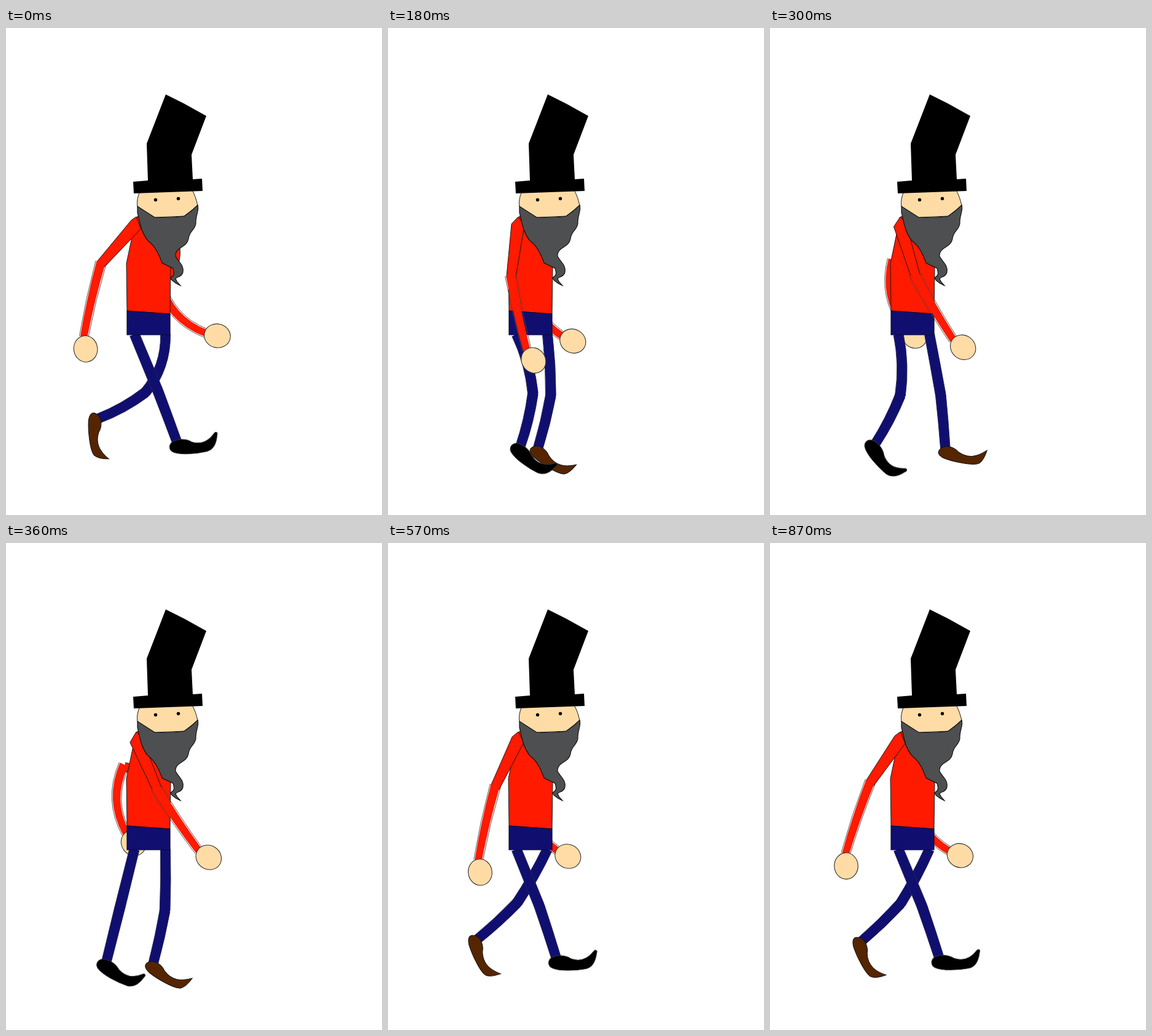
These frames come from a looping animation (612 by 792 pixels, 900 ms). An HTML page with a canvas:

```html
<!DOCTYPE html>
<html lang="en">
<head>
<meta charset="utf-8">
<title>Walking man</title>
<style>
html, body { margin: 0; width: 100%; height: 100%; overflow: hidden; background: #fff; }
canvas { display: block; width: 612px; height: 792px; }
</style>
</head>
<body>
<canvas id="stage" width="612" height="792"></canvas>
<script>
const ctx = document.getElementById('stage').getContext('2d');
const LOOP = 900, STEP = 30;
const RED = '#ff1a00', BLUE = '#100f70', SKIN = '#ffdca6', BROWN = '#552500', INK = '#1a1a1a';

// Joint angles in degrees from straight down, positive to the right
const TIMES = [0, 120, 240, 360, 480, 570, 870];
const GAIT = {
  nearArm: [-42, -21, 5, 23, -2, -26, -35],
  farArm: [19, 10.5, -3, -28.5, -9.5, 2, 7.5],
  nearLeg: [21.5, 13.5, -10, -14, 13, 20, 20.5],
  nearKnee: [1, 0, 29, 0, 1, 2, 2],
  farLeg: [-40, -30.5, 16, -6.5, -32, -38.5, -37],
  farKnee: [21, 18, 0, 6, 7, 9, 9]
};

const hat = new Path2D('M260 108L290 123L326 143L302 206L304 246L319 245L320 265L208 269L207 250L231 248L229 188Z');
const head = new Path2D('M218 266Q212 278 214 291L242 308L290 306L312 289Q309 274 303 264Z');
const beard = new Path2D('M214 290L242 308Q275 309 290 306Q302 298 312 288C315 296 308 306 309 318C307 330 298 330 297 343C294 358 275 356 276 371C280 380 290 385 288 397C286 406 277 404 276 408C278 414 282 416 284 419C278 416 268 411 268 406C275 402 274 398 272 391L254 382C248 365 240 352 231 346C219 331 218 315 214 300Z');
const shirt = new Path2D('M214 306L206 335L196 383L197 460L267 465L268 388L268 330Z');
const trousers = new Path2D('M197 460L267 465V499H197Z');
const blackShoe = new Path2D('M-10 2C-4 -5 14 -5 24 2C40 8 52 2 61 -9C64 -13 68 -11 66 -6C64 8 58 17 48 19C30 22 5 22 -6 17C-13 14 -14 7 -10 2Z');
const brownShoe = new Path2D('M-7 1C0 -7 14 -5 22 1C40 9 54 2 67 -11C66 0 63 8 59 12C50 19 15 18 2 16C-11 13 -12 7 -7 1Z');

// Monotone cubic through the keys, so turning points stay at the keys
function slope(keys, i) {
  const d = j => (keys[j + 1] - keys[j]) / (TIMES[j + 1] - TIMES[j]);
  if (i === 0) return d(0);
  if (i === keys.length - 1) return d(i - 1);
  const a = d(i - 1), b = d(i);
  return a * b > 0 ? 2 * a * b / (a + b) : 0;
}

function sample(keys, t) {
  let i = TIMES.length - 2;
  while (i > 0 && t < TIMES[i]) i--;
  const h = TIMES[i + 1] - TIMES[i], u = Math.min(1, (t - TIMES[i]) / h);
  const u2 = u * u, u3 = u2 * u;
  return keys[i] + (keys[i + 1] - keys[i]) * (3 * u2 - 2 * u3) +
    h * (slope(keys, i) * (u3 - 2 * u2 + u) + slope(keys, i + 1) * (u3 - u2));
}

const rad = deg => deg * Math.PI / 180;
const polar = (p, deg, len) => [p[0] + Math.sin(rad(deg)) * len, p[1] + Math.cos(rad(deg)) * len];
const shift = (p, n, d) => [p[0] + n[0] * d, p[1] + n[1] * d];

function normal(a, b) {
  const dx = b[0] - a[0], dy = b[1] - a[1], len = Math.hypot(dx, dy) || 1;
  return [-dy / len, dx / len];
}

function paint(path, fill, line, width = 1) {
  if (fill) { ctx.fillStyle = fill; ctx.fill(path); }
  if (line) { ctx.strokeStyle = line; ctx.lineWidth = width; ctx.stroke(path); }
}

function dot(x, y, r, fill) {
  const p = new Path2D();
  p.arc(x, y, r, 0, 7);
  paint(p, fill);
}

// Bent tube with half widths wa, wb; its outline stands off by gap
function tube(a, b, bow, wa, wb, fill, line, gap = 0) {
  const n = normal(a, b);
  const c = shift([(a[0] + b[0]) / 2, (a[1] + b[1]) / 2], n, bow);
  const na = normal(a, c), nb = normal(c, b);
  const edge = (s, g) => [
    shift(a, na, s * (wa + g)), shift(c, n, s * ((wa + wb) / 2 + g)), shift(b, nb, s * (wb + g))
  ];
  const body = new Path2D(), rim = new Path2D();
  const [l0, l1, l2] = edge(1, 0), [r0, r1, r2] = edge(-1, 0);
  body.moveTo(...l0);
  body.quadraticCurveTo(...l1, ...l2);
  body.lineTo(...r2);
  body.quadraticCurveTo(...r1, ...r0);
  body.closePath();
  for (const s of [1, -1]) {
    const [p, q, r] = edge(s, gap);
    rim.moveTo(...p);
    rim.quadraticCurveTo(...q, ...r);
  }
  paint(body, fill);
  paint(rim, null, line, 0.9);
}

function drawLeg(hip, swing, bend, shoe, fill, line) {
  const knee = polar(hip, swing + bend, 100);
  const ankle = polar(knee, swing - bend, 88);
  tube(hip, knee, -bend * bend / 24, 8, 8.4, BLUE, '#252550');
  tube(knee, ankle, -0.3 * bend, 8.4, 7.8, BLUE, '#252550');
  dot(...knee, 8.2, BLUE);
  ctx.save();
  ctx.translate(...ankle);
  ctx.rotate(rad(15 - 0.95 * swing + 1.5 * bend)); // a lifted heel tips the toe down
  paint(shoe, fill, line);
  ctx.restore();
}

function drawForearm(elbow, angle, len, bow, cock) {
  const wrist = polar(elbow, angle, len);
  const [hx, hy] = polar(wrist, angle + cock, 19.5);
  tube(polar(elbow, angle, -4), wrist, bow, 7.4, 5.8, RED, '#444', 1.5);
  const hand = new Path2D();
  hand.ellipse(hx, hy, 21.4, 19.3, rad(90 - angle - cock), 0, 7);
  paint(hand, SKIN, '#333', 1.1);
}

function drawFarArm(swing) {
  const shoulder = [270, 335], elbow = polar(shoulder, 1.2 * swing - 35, 83);
  tube(shoulder, elbow, -28, 8, 7.5, RED, INK);
  drawForearm(elbow, 0.85 * swing + 26, 108, 28, 35);
}

function drawNearArm(swing, flex) {
  const shoulder = [212, 320], elbow = polar(shoulder, swing, 87), n = normal(shoulder, elbow);
  const sleeve = new Path2D();
  sleeve.moveTo(...shift(elbow, n, 7.5));
  sleeve.lineTo(...shift(shoulder, n, 11));
  sleeve.lineTo(212, 307);
  sleeve.lineTo(...shift(shoulder, n, -10));
  sleeve.lineTo(...shift(elbow, n, -7.5));
  paint(sleeve, RED, INK);
  drawForearm(elbow, swing + flex, 121, 3, 22);
}

function draw(t) {
  const at = name => sample(GAIT[name], t);
  // the elbow opens on the way forward and closes slowly on the way back
  const flex = 11 + Math.max(0, 360 - t) / 20 + Math.max(0, t - 360) / 100;
  ctx.fillStyle = '#fff';
  ctx.fillRect(0, 0, 612, 792);
  drawFarArm(at('farArm'));
  drawLeg([259.5, 498], at('farLeg'), at('farKnee'), brownShoe, BROWN, '#111');
  drawLeg([209, 498], at('nearLeg'), at('nearKnee'), blackShoe, '#000', '#333');
  paint(shirt, RED, INK);
  paint(trousers, BLUE, '#0a0a28', 1.2);
  drawNearArm(at('nearArm'), flex);
  paint(head, SKIN, INK);
  paint(beard, '#4e4f50', '#111', 1.2);
  dot(243.5, 279.5, 2.7, '#000');
  dot(280.5, 277.5, 2.7, '#000');
  paint(hat, '#000');
}

function tick(now) {
  let t = Math.floor(now % LOOP / STEP) * STEP;
  if (t > 600 && t < 870) t -= (t - 600) % 60; // slower steps near the end
  draw(t);
  requestAnimationFrame(tick);
}
tick(performance.now());
</script>
</body>
</html>
```
